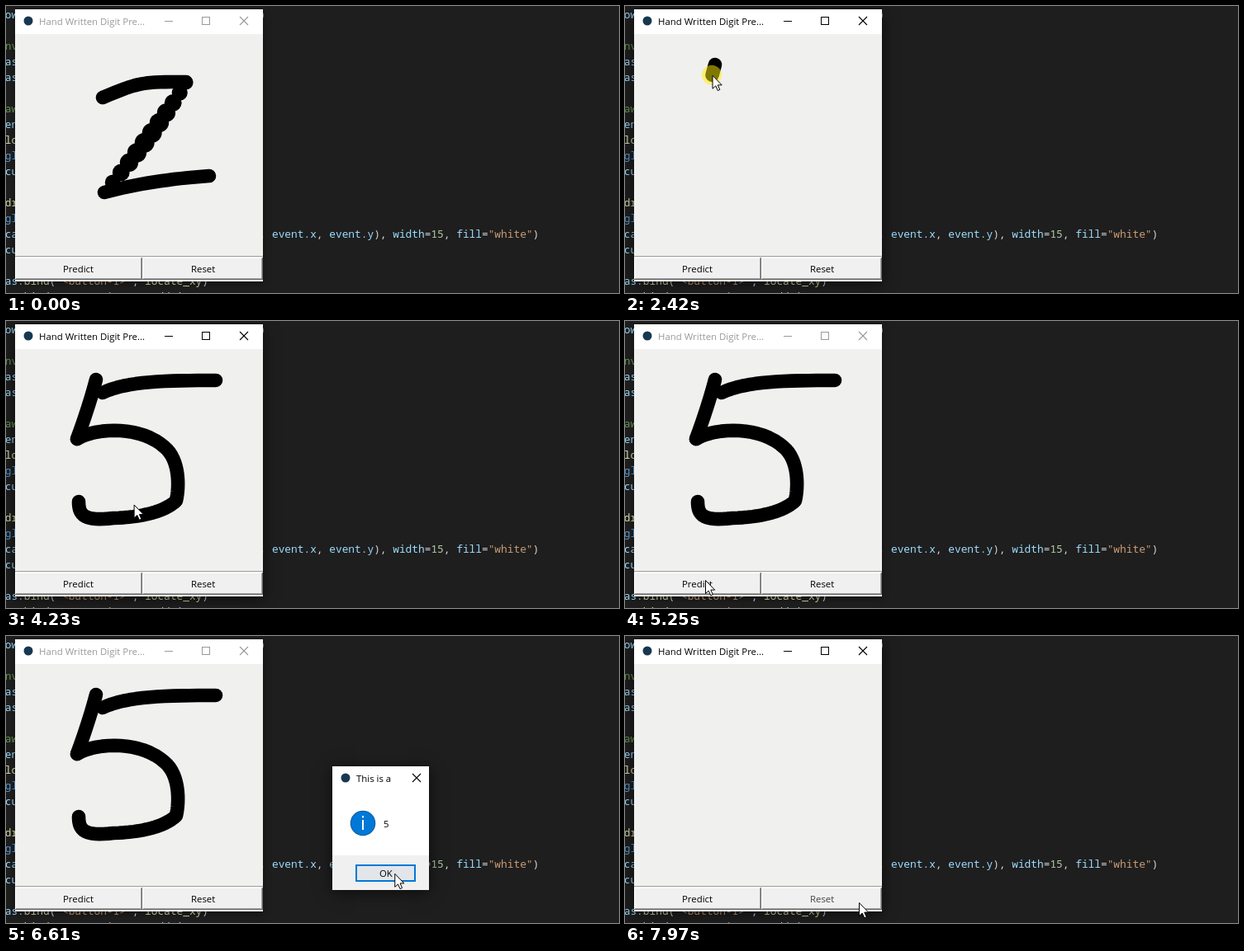
These frames come from a looping animation (742x348 px, 8000 ms). An HTML page with a canvas:

```html
<!DOCTYPE html>
<html lang="en">
<head>
<meta charset="utf-8">
<title>Digit sketch</title>
<style>
html, body { margin: 0; width: 100%; height: 100%; overflow: hidden; background: #1e1e1e; }
canvas { display: block; }
</style>
</head>
<body>
<canvas id="stage" width="742" height="348"></canvas>
<script>
const ctx = document.getElementById('stage').getContext('2d');
const LOOP = 8000, STEP = 70, PHASE = 30;
const UI = '11.4px "Open Sans", "Noto Sans", sans-serif';
const MONO = '500 12.83px "Noto Sans Mono", "DejaVu Sans Mono", monospace';
const COL = 7.697, ROW = 19;

const listing = `ow.title("Hand Written Digit Prediction")

nv
as
as

aw
en
lo
gl
cu

dr
gl
${'ca'.padEnd(40)}, event.x, event.y), width=15, fill="white")
cu

as.bind("<button-1>", locate_xy)
as.bind("<B1-Motion>", addLine)`.split('\n');

const syntax = [
  [/^(nv|aw)$/, '#6a9955'],
  [/^gl$/, '#569cd6'],
  [/^"/, '#ca9c74'],
  [/^\d/, '#b5cea8'],
  [/^(lo|dr|bind|title)/, '#dcdcaa'],
  [/^\w/, '#9cdcfe'],
  [/./, '#d4d4d4']
];

const mix = (a, b, u) => a.map((v, i) => v + (b[i] - v) * u);
const clamp = v => Math.max(0, Math.min(1, v));
const last = list => list[list.length - 1];

function bezier(pts, u) {
  while (pts.length > 1) pts = pts.slice(1).map((p, i) => mix(pts[i], p, u));
  return pts[0];
}

const curve = (...pts) => Array.from({ length: 17 }, (_, i) => bezier(pts, i / 16));

const zTop = curve([117, 111], [162, 92], [165, 92], [218, 92]);
const zSlant = [[218, 93], [176, 160], [119, 226]];
const zBase = curve([119, 226], [175, 211], [246, 206]);
const fiveStem = curve([109, 71], [101, 102], [86, 143]);
const fiveBowl = [
  ...curve([86, 143], [112, 128], [165, 128], [192, 153]),
  ...curve([192, 153], [210, 168], [210, 200], [206, 218]),
  ...curve([206, 218], [192, 231], [165, 238], [130, 239]),
  ...curve([130, 239], [95, 243], [88, 236], [88, 219])
];
const fiveTop = curve([117, 87], [145, 73], [195, 72], [254, 72]);

// The pointer's script: each move starts where the one before ended
const moves = [], clicks = [];
let pen = [334, 277];
function glide(from, to, x, y) {
  moves.push({ from, to, path: [pen, [x, y]] });
  pen = [x, y];
}
function draw(from, to, path) {
  moves.push({ from, to, path, ink: true });
  pen = last(path);
}
const click = (target, from, to = from + STEP) => clicks.push({ target, from, to });

glide(790, 1200, 250, 318);
click('Reset', 1460);
glide(1860, 2340, 109, 71);
draw(2340, 2740, fiveStem);
draw(2740, 3332, fiveBowl);
glide(3332, 3600, 117, 87);
draw(3740, 4020, fiveTop);
glide(4060, 4436, 112, 287);
glide(4560, 4860, 97, 314);
click('Predict', 4960, 5050);
glide(6050, 6430, 564, 300);
glide(6430, 6670, 464, 287);
click('OK', 6820);
glide(7290, 7720, 283, 323);
click('Reset', 7800, 7880);

const during = (t, a) => t >= a.from && t < a.to;
const isDown = (target, t) => clicks.some(c => c.target === target && during(t, c));
const resets = clicks.filter(c => c.target === 'Reset').map(c => c.to);

// Leading part of a path, by length
function part(path, share) {
  const gaps = path.slice(1).map((p, i) => Math.hypot(p[0] - path[i][0], p[1] - path[i][1]));
  let left = share * gaps.reduce((a, b) => a + b, 0);
  const out = [path[0]];
  for (let i = 0; i < gaps.length && left > 0; i++) {
    out.push(mix(path[i], path[i + 1], gaps[i] ? Math.min(1, left / gaps[i]) : 1));
    left -= gaps[i];
  }
  return out;
}

function trail({ from, to, path, ink }, t) {
  const u = clamp((t - from) / (to - from));
  return part(path, ink ? u : 1 - (1 - u) ** 2);
}

function rect(x, y, w, h, fill) {
  ctx.fillStyle = fill;
  ctx.fillRect(x, y, w, h);
}

function disc(x, y, r, fill) {
  ctx.fillStyle = fill;
  ctx.beginPath();
  ctx.arc(x, y, r, 0, 7);
  ctx.fill();
}

function text(s, x, y, fill = '#000', font = UI) {
  ctx.font = font;
  ctx.fillStyle = fill;
  ctx.fillText(s, x, y);
}

function line(pts, width, color) {
  ctx.strokeStyle = color;
  ctx.lineWidth = width;
  ctx.beginPath();
  pts.forEach(p => ctx.lineTo(p[0], p[1]));
  ctx.stroke();
}

function ink(pts) {
  ctx.save();
  ctx.lineCap = ctx.lineJoin = 'round';
  line(pts, 16.6, '#000');
  ctx.restore();
}

function cross(x, y, color) {
  line([[x - 5, y - 5], [x + 5, y + 5]], 1.1, color);
  line([[x - 5, y + 5], [x + 5, y - 5]], 1.1, color);
}

function panel(x, y, w, h, blur, alpha) {
  ctx.save();
  ctx.shadowColor = `rgba(0,0,0,${alpha})`;
  ctx.shadowBlur = blur;
  ctx.shadowOffsetY = 3;
  rect(x, y, w, h, '#fff');
  ctx.restore();
}

function titleBar(x, y, width, label, tone) {
  disc(x + 16, y + 14, 5.5, '#17384f');
  text(label, x + 29, y + 19, tone);
  cross(x + width, y + 14, tone);
}

function drawCode() {
  rect(0, 0, 742, 348, '#1e1e1e');
  listing.forEach((s, row) => {
    for (const m of s.matchAll(/"[^"]*"|\w+\.?|[^\w"\s]+/g)) {
      const color = syntax.find(([rule]) => rule.test(m[0]))[1];
      text(m[0], m.index * COL - 1.3, 15 + row * ROW, color, MONO);
    }
  });
}

function button(label, x, w, tx, t, color) {
  const y = 305, h = 27, down = isDown(label, t) ? 1 : 0;
  rect(x, y, w, h, '#f0f0f0');
  if (down) {
    rect(x, y + 1, w, 2, '#696969');
    rect(x, y + 1, 2, h - 2, '#696969');
    rect(x + 1, y + h - 2, w - 1, 1, '#fff');
    rect(x + w - 1, y + 1, 1, h - 2, '#fff');
  } else {
    rect(x, y, w, h, '#696969');
    rect(x, y, w - 1, h - 1, '#fff');
    rect(x + 1, y + 1, w - 2, h - 2, '#a0a0a0');
    rect(x + 1, y + 1, w - 3, h - 3, '#f0f0f0');
  }
  text(label, tx + down, 323 + down, color);
}

function drawZ() {
  ink(zTop);
  ink(zBase);
  for (let u = 0; u <= 1; u += 1 / 11) {
    disc(...bezier(zSlant, u), 8.5 + 3.5 * Math.sin(Math.PI * u), '#000');
  }
}

function drawWindow(t, beat) {
  const active = t >= 1460 && t < 5250 || t >= 6960;
  const tone = active ? '#000' : '#999';
  panel(11, 4, 300, 330, active ? 16 : 9, active ? 0.6 : 0.4);
  titleBar(11, 4, 277, 'Hand Written Digit Pre...', tone);
  rect(192, 18, 10, 1, tone);
  ctx.strokeStyle = tone;
  ctx.lineWidth = 1;
  ctx.strokeRect(237.5, 13.5, 9, 9);
  rect(11, 34, 300, 300, '#f0f0ef');
  rect(11, 303, 300, 1, '#a0a0a0');

  if (t < resets[0]) drawZ();
  else if (t < resets[1]) {
    moves.filter(m => m.ink && beat >= m.from).forEach(m => ink(trail(m, beat)));
  }
  button('Predict', 11, 154, 69, t);
  button('Reset', 165, 146, 224, t, t > resets[1] ? '#444' : '#000');
}

function drawDialog(t, beat) {
  const alpha = clamp((beat - 5250) / 280) * clamp(1 - (beat - 6890) / 280);
  if (!alpha) return;
  const down = isDown('OK', t), size = 0.92 + 0.08 * alpha;
  ctx.save();
  ctx.globalAlpha = alpha;
  ctx.translate(453.5, 233);
  ctx.scale(size, size);
  ctx.translate(-453.5, -233);
  panel(395, 158, 117, 150, 18, 0.6);
  titleBar(395, 158, 102, 'This is a', '#000');
  disc(432, 227, 15.3, '#0b5ca3');
  disc(432, 227, 14.2, '#0078d7');
  rect(431, 223, 2, 12, '#fff');
  rect(431, 218, 2, 2.4, '#fff');
  text('5', 457, 232);
  rect(395, 266, 117, 42, '#f0f0f0');
  rect(423, 277, 73, 21, down ? '#005499' : '#0078d7');
  rect(425, 279, 69, 17, down ? '#cce4f7' : '#e2e6ea');
  text('OK', 452, 292);
  ctx.restore();
}

function drawPointer(t, beat) {
  const move = last(moves.filter(m => m.from <= beat));
  if (!move) return;
  const [x, y] = last(trail(move, beat));
  const held = clicks.some(c => during(t, c)) || move.ink && during(beat, move);
  if (held) disc(x - 0.5, y, 12, 'rgba(255,240,0,0.5)');
  ctx.save();
  ctx.translate(x + 0.5, y + 0.5);
  ctx.beginPath();
  [[0, 0], [0, 16], [3.7, 12.6], [6.3, 18.3], [8.8, 17.2], [6.3, 11.6], [11.2, 11.6]]
    .forEach(p => ctx.lineTo(p[0], p[1]));
  ctx.closePath();
  ctx.fillStyle = '#fff';
  ctx.fill();
  ctx.strokeStyle = '#000';
  ctx.lineWidth = 1;
  ctx.stroke();
  ctx.restore();
}

function render(t) {
  const beat = Math.floor((t - PHASE) / STEP) * STEP + PHASE;
  drawCode();
  drawWindow(t, beat);
  drawDialog(t, beat);
  drawPointer(t, beat);
}

const start = performance.now();
function tick() {
  render(Math.max(0, performance.now() - start) % LOOP);
  requestAnimationFrame(tick);
}
tick();
</script>
</body>
</html>
```
